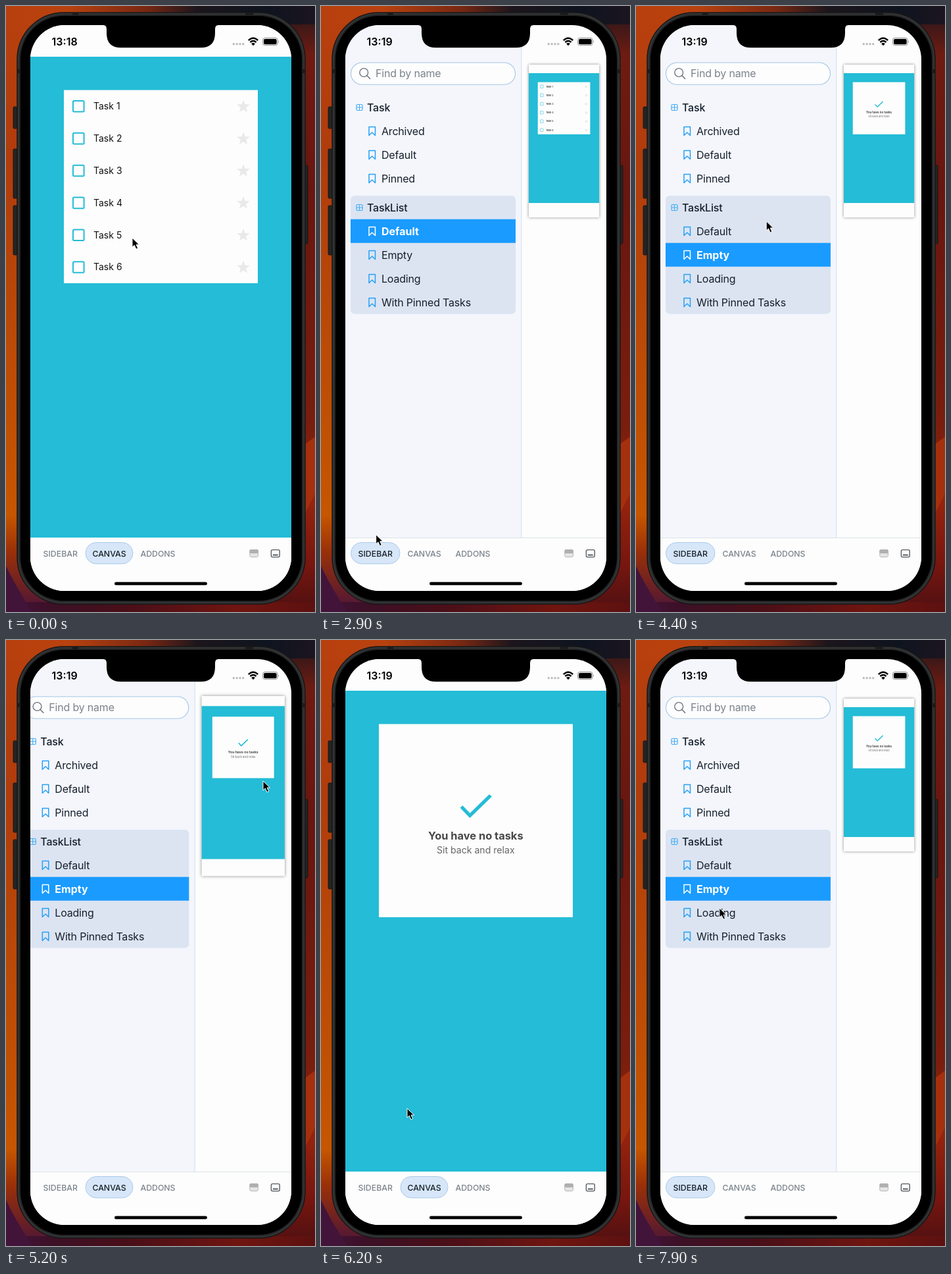
An HTML page that plays this animation: 470x920 px, repeating every 8 s.

```html
<!DOCTYPE html>
<html lang="en">
<head>
<meta charset="utf-8">
<title>Task list on a phone</title>
<style>
  html, body { margin: 0; width: 100%; height: 100%; overflow: hidden; background: #000; }
  svg { display: block; width: 470px; height: 920px; }
  text { font-family: Inter, Roboto, sans-serif; }
  .label { letter-spacing: -.2px; }
  .shadow { filter: drop-shadow(0 0 8px rgba(0, 0, 0, .45)); }
</style>
</head>
<body>
<svg id="stage" viewBox="0 0 470 920" xmlns="http://www.w3.org/2000/svg"></svg>
<script>
const LOOP = 8000, STEP = 100;
const TEAL = '#24bcd6', BLUE = '#1a9bff', WHITE = '#fdfdfd', INK = '#16202b';
const stage = document.getElementById('stage');

const rect = (x, y, w, h, fill, r = 0, more = '') =>
  `<rect x="${x}" y="${y}" width="${w}" height="${h}" rx="${r}" fill="${fill}" ${more}/>`;
const line = (d, color, width, more = '') =>
  `<path d="${d}" fill="none" stroke="${color}" stroke-width="${width}" ${more}/>`;
const text = (x, y, size, str, fill, weight = 400, more = '') =>
  `<text x="${x}" y="${y}" font-size="${size}" fill="${fill}" font-weight="${weight}" ${more}>${str}</text>`;
const label = (x, y, str, weight) => text(x, y + 5.8, 16, str, INK, weight, 'class="label"');
const grad = (id, dir, ...stops) =>
  `<linearGradient id="${id}" x2="${dir === 'x' ? 1 : 0}" y2="${dir === 'x' ? 0 : 1}">` +
  stops.map(([o, c]) => `<stop offset="${o}" stop-color="${c}"/>`).join('') + '</linearGradient>';

function star(cx, cy, r) {
  const pts = [];
  for (let i = 0; i < 10; i++) {
    const a = -Math.PI / 2 + i * Math.PI / 5, k = i % 2 ? r * .42 : r;
    pts.push((cx + k * Math.cos(a)).toFixed(2) + ',' + (cy + k * Math.sin(a)).toFixed(2));
  }
  return `<polygon points="${pts.join(' ')}" fill="#e9e9e9"/>`;
}

function wallpaper() {
  return rect(0, 0, 240, 920, 'url(#left)') + rect(240, 0, 230, 920, 'url(#right)') +
    '<path d="M440 676L470 654V740L440 800Z" fill="#a5300d"/>' +
    rect(0, 0, 470, 28, 'url(#top)') + rect(0, 905, 470, 15, 'url(#bottom)') +
    '<path d="M0 850Q14 880 40 920H0Z" fill="#43143a"/>';
}

function body() {
  const buttons = [[11, 153, 33], [11, 217, 75], [11, 303, 75], [453, 242, 119]]
    .map(([x, y, h]) => rect(x, y, 6, h, '#242424', 1.5, 'stroke="#111" stroke-width=".8"')).join('');
  return buttons +
    rect(17, 10, 438, 898, '#333435', 71, 'stroke="#171717" stroke-width="1.5"') +
    rect(20, 13, 432, 892, '#242526', 68) +
    rect(101, 10, 9, 4, '#1b1b1b') + rect(364, 10, 12, 4, '#1b1b1b') +
    rect(17, 96, 4, 6, '#1b1b1b') + rect(451, 96, 4, 6, '#1b1b1b') +
    rect(22, 15, 428, 888, '#000', 66);
}

function tasks() {
  let out = '';
  for (let i = 0; i < 6; i++) {
    const y = 152.2 + i * 48.85;
    out += rect(102, y - 8.2, 16.6, 16.6, 'none', 1.5, `stroke="${TEAL}" stroke-width="2"`) +
      text(133, y + 5, 14, 'Task ' + (i + 1), '#111') + star(361, y + .6, 10.3);
  }
  return out;
}

function emptyCard() {
  return line('M213.5 253L226.5 266.5L258 236', TEAL, 5.2) +
    text(235.3, 302.5, 16.4, 'You have no tasks', '#484848', 700, 'text-anchor="middle"') +
    text(235.3, 324.2, 14.1, 'Sit back and relax', '#666', 400, 'text-anchor="middle"');
}

function sidebar() {
  const grid = y => rect(54, y - 4.5, 9, 9, 'none', 1.5, 'stroke="#43aef3" stroke-width="1.2"') +
    line(`M58.5 ${y - 4.5}v9M54 ${y}h9`, '#43aef3', 1.1);
  const mark = (y, color) => line(`M73 ${y - 6.5}h9.5v13l-4.75 -4.5l-4.75 4.5z`, color, 1.5, 'stroke-linejoin="round"');
  const story = (y, name) => mark(y, '#27a0f5') + label(92, y, name, 400);
  const picked = (id, y, name) => `<g id="${id}">` + rect(45, y - 18.3, 251, 36, BLUE) +
    mark(y, '#fff') + text(92, y + 5.8, 16, name, '#fff', 700) + '</g>';
  return rect(37, 29, 268, 779, '#f4f6fc') + rect(304.4, 29, 1, 779, '#cfe0ee') +
    rect(45.5, 86, 250, 33.2, WHITE, 16.6, 'stroke="#a3c6e4" stroke-width="1.1"') +
    '<circle cx="65.2" cy="101" r="6.4" fill="none" stroke="#6f7780" stroke-width="1.4"/>' +
    line('M70 105.8L74.6 110.4', '#6f7780', 1.5, 'stroke-linecap="round"') +
    text(83, 108.2, 16, 'Find by name', '#7b838b', 400, 'class="label"') +
    grid(154) + label(70, 154, 'Task', 500) +
    ['Archived', 'Default', 'Pinned'].map((n, i) => story(190 + 36 * i, n)).join('') +
    rect(45, 288, 251, 179.5, '#dce4f2', 6) +
    grid(306) + label(70, 306, 'TaskList', 500) +
    ['Default', 'Empty', 'Loading', 'With Pinned Tasks'].map((n, i) => story(342 + 36 * i, n)).join('') +
    picked('pickDefault', 342, 'Default') + picked('pickEmpty', 378, 'Empty');
}

function nav() {
  const tab = (id, x, w, name) =>
    rect(x, 814.5, w, 32.4, '#d7e6f8', 16.2, `id="${id}Pill" stroke="#a9cbea" stroke-width="1"`) +
    text(x + w / 2, 835.6, 12.3, name, '#7b838b', 500, `id="${id}Text" text-anchor="middle"`);
  return rect(37, 807, 397, 82, WHITE) + rect(37, 807, 397, 1, '#dce2e9', 0, 'id="navLine"') +
    tab('side', 45.5, 74.5, 'SIDEBAR') + tab('canvas', 121, 72, 'CANVAS') +
    text(231, 835.6, 12.3, 'ADDONS', '#7b838b', 500, 'text-anchor="middle"') +
    rect(370.8, 825.5, 12.6, 11, '#e5e5e5', 2, 'stroke="#b5b5b5" stroke-width="1"') +
    rect(370.5, 825, 13.2, 6, '#b0b0b0', 2) +
    rect(403.4, 825.6, 12.8, 11, 'none', 2, 'stroke="#555b60" stroke-width="1.4"') +
    rect(405.8, 832.4, 8, 2.2, '#555b60', .6) +
    rect(165, 874.5, 141, 4.8, '#000', 2.4);
}

function statusBar() {
  const dots = [346.3, 351.2, 356, 360.8].map(x => `<circle cx="${x}" cy="57.8" r="1.7" fill="#bcbcbc"/>`).join('');
  return text(69.6, 59.8, 16, '', '#000', 600, 'id="clock"') + dots +
    line('M368.8 52.2Q376 45.4 383.2 52.2', '#000', 2.5) +
    line('M371.4 55Q376 50.8 380.6 55', '#000', 2.4) +
    '<path d="M373.1 57.2Q376 54.8 378.9 57.2L376 60.2Z"/>' +
    rect(390.5, 48.5, 22.6, 11.2, 'none', 3.2, 'stroke="#8f8f8f" stroke-width="1"') +
    rect(392, 50, 19.6, 8.2, '#000', 2) +
    '<path d="M414.2 52.3Q416 54.1 414.2 56Z" fill="#8f8f8f"/>';
}

stage.innerHTML = '<defs>' +
  grad('left', 'y', [0, '#b8400e'], [.25, '#b03c0c'], [.5, '#b84808'], [.84, '#c65600'], [.9, '#9a3009'], [1, '#4a1538']) +
  grad('right', 'y', [0, '#1c1520'], [.03, '#3c1818'], [.08, '#6e1c12'], [.3, '#681610'], [.7, '#7a1e0e'], [.8, '#9a260d'], [.92, '#78160f'], [1, '#4d1012']) +
  grad('top', 'x', [0, '#b8400e'], [.2, '#b8420f'], [.45, '#7a2812'], [.62, '#1c151c'], [.85, '#0e141f'], [1, '#1c1520']) +
  grad('bottom', 'x', [0, '#43143a'], [.15, '#3c1026'], [.4, '#4a0f18'], [.75, '#701510'], [1, '#5c1110']) +
  '<clipPath id="screen">' + rect(37, 29, 397, 859, '#000', 52) + '</clipPath></defs>' +
  wallpaper() + body() +
  '<g clip-path="url(#screen)">' + rect(37, 29, 397, 859, WHITE) +
  `<g id="side">${sidebar()}</g><g id="view">` +
  rect(37, 29, 397, 859, WHITE, 0, 'class="shadow"') + rect(37, 77, 397, 730, TEAL) +
  rect(88, 127.6, 295, 293.2, WHITE) +
  `<g id="tasks">${tasks()}</g><g id="empty">${emptyCard()}</g></g>` +
  nav() + statusBar() + '</g>' +
  '<path d="M148 28H323V29Q318 29 318 35V41Q318 63.3 296 63.3H175Q153 63.3 153 41V35Q153 29 148 29Z"/>' +
  '<path id="cursor" d="M0 0V14.2L3.3 11.2L5.9 17L8.6 15.8L6.1 10.2H10.5Z" stroke="#fff" stroke-width="1"/>';

const el = id => document.getElementById(id);
const show = (id, on) => el(id).setAttribute('visibility', on ? 'visible' : 'hidden');

// time, x, y of the pointer
const PATH = [
  [0, 192, 352], [100, 192, 352], [400, 188, 362], [700, 188, 362], [1900, 90, 812], [2050, 82, 825],
  [2800, 82, 825], [3500, 112, 420], [3700, 109, 379], [4100, 109, 379], [4900, 391, 214],
  [5300, 391, 214], [6200, 131, 711], [6900, 79, 825], [7500, 79, 825], [7900, 127, 407], [8000, 127, 407]
];
// sidebar slides: start, from, to
const SLIDES = [[2080, 0, 1], [5153, 1, 0], [7385, 0, 1]];
const SLIDE_MS = 300, CLOCK = 800, PICK = 3900;

const ease = k => k * k * (3 - 2 * k);

function pointer(t) {
  const i = Math.max(1, PATH.findIndex(p => p[0] > t));
  const a = PATH[i - 1], b = PATH[i], k = ease((t - a[0]) / (b[0] - a[0]));
  return [a[1] + (b[1] - a[1]) * k, a[2] + (b[2] - a[2]) * k];
}

function slide(t) {
  let p = 0;
  for (const [start, from, to] of SLIDES)
    if (t >= start) p = from + (to - from) * ease(Math.min(1, (t - start) / SLIDE_MS));
  return p;
}

function setTab(id, on, fresh) {
  show(id + 'Pill', on);
  el(id + 'Pill').setAttribute('opacity', fresh ? .75 : 1);
  el(id + 'Text').setAttribute('fill', on ? (fresh ? '#44505b' : INK) : '#7b838b');
}

function draw(t) {
  const p = slide(t), last = SLIDES.filter(s => t >= s[0]).pop();
  const sideOn = !!last && last[2] === 1, empty = t >= PICK;
  el('clock').textContent = t < CLOCK ? '13:18' : '13:19';
  el('side').setAttribute('transform', `translate(${-268 * (1 - p)} 0)`);
  el('view').setAttribute('transform',
    `translate(${37 + 279 * p} ${29 + 60 * p}) scale(${1 - .73 * p}) translate(-37 -29)`);
  show('tasks', !empty);
  show('empty', empty);
  show('pickDefault', !empty);
  show('pickEmpty', empty);
  show('navLine', p > 0);
  setTab('side', sideOn, sideOn && t - last[0] < 100);
  setTab('canvas', !sideOn, false);
  el('cursor').setAttribute('transform', `translate(${pointer(t).join(' ')})`);
}

const begin = performance.now();
function tick() {
  const t = (performance.now() - begin) % LOOP;
  draw(Math.floor(t / STEP) * STEP);
  requestAnimationFrame(tick);
}
tick();
</script>
</body>
</html>
```
